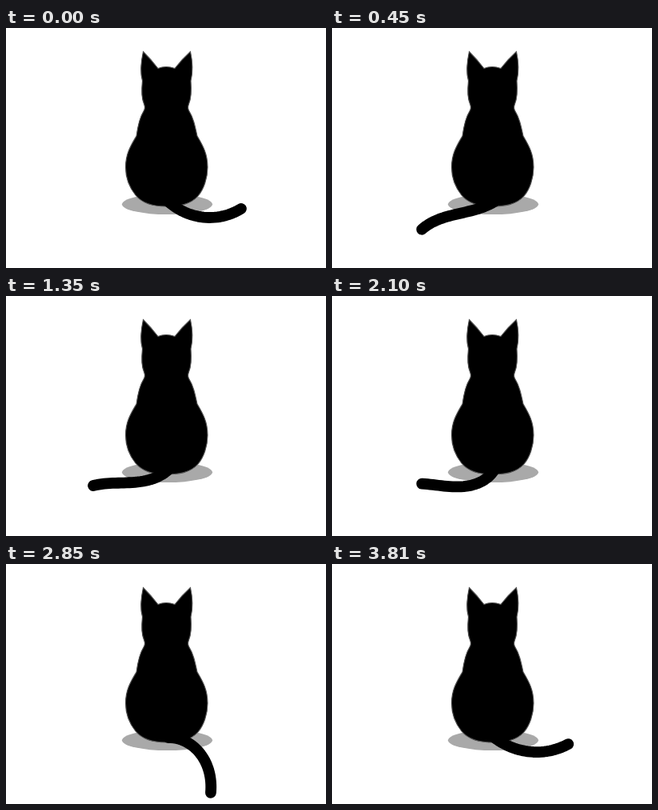
Write an HTML page that moves like this. It is 400 px wide and 300 px high and loops after 3.84 s.

```html
<!DOCTYPE html>
<html lang="en">
<head>
<meta charset="utf-8">
<title>Cat</title>
<style>
  html, body { margin: 0; width: 100%; height: 100%; overflow: hidden; background: #fff; }
  svg { display: block; width: 100%; height: 100%; }
</style>
</head>
<body>
<svg viewBox="0 0 400 300">
  <ellipse cx="201.5" cy="220.3" rx="56.5" ry="12.8" fill="#a9a9a9"/>
  <path stroke="#555" stroke-width="1.1" d="M171.5 29.5 Q181 39 190 50.500 Q200 46.5 211 50.500 Q220 39 230.5 29.5
    C233 41 234 54 231 66 C232 80 231.5 88 228.5 95 Q226.500 100 229 104 C234 112 236 121 239 135
    C246 147 252 157 252 174 C252 188 247 202 240 210 C230 221 216 223 200 223
    C185 223 171 220 162 209 C154 199 149.500 188 149.500 174 C149.500 157 156 147 163 135
    C165 121 167 112 172 104 Q174.500 100 172.5 95 C169.500 88 169 80 170.500 66 C167 54 169 41 171.5 29.5 Z"/>
  <path id="tail" fill="none" stroke="#000" stroke-width="13.8" stroke-linecap="round" stroke-linejoin="round"/>
</svg>
<script>
const LOOP = 3840, LENGTH = 98, STEPS = 28;
const ROOT = [203, 217];
const tail = document.getElementById('tail');

const linear = u => u;
const easeOut = u => Math.sin(u * Math.PI / 2);

// Keys: time, value in degrees, easing towards the next key
const heading = [[0, 5, easeOut], [450, 159, linear], [2080, 175, easeOut],
  [2680, 59, linear], [3360, 32, linear], [3800, 5, linear], [LOOP, 5]];
const curl = [[0, -74, linear], [450, -10, linear], [2850, 96, linear],
  [3360, 58, linear], [LOOP, -74]];

function sample(keys, t) {
  const i = keys.findIndex(key => key[0] > t);
  const [t0, from, ease] = keys[i - 1], [t1, to] = keys[i];
  return from + (to - from) * ease((t - t0) / (t1 - t0));
}

// The tail keeps its length; its direction bends along s = 0..1
function draw(t) {
  const mean = sample(heading, t), turn = sample(curl, t);
  const bend = 0.15 * mean, step = LENGTH / STEPS;
  let [x, y] = ROOT, d = `M${x} ${y}`;
  for (let i = 0; i < STEPS; i++) {
    const s = (i + 0.5) / STEPS;
    const angle = mean + turn * (s - 0.5) + bend * (4 * s * (1 - s) - 2 / 3);
    x += step * Math.cos(angle * Math.PI / 180);
    y += step * Math.sin(angle * Math.PI / 180);
    d += `L${x.toFixed(2)} ${y.toFixed(2)}`;
  }
  tail.setAttribute('d', d);
}

const start = performance.now();
function tick() {
  draw((performance.now() - start) % LOOP);
  requestAnimationFrame(tick);
}
tick();
</script>
</body>
</html>
```
